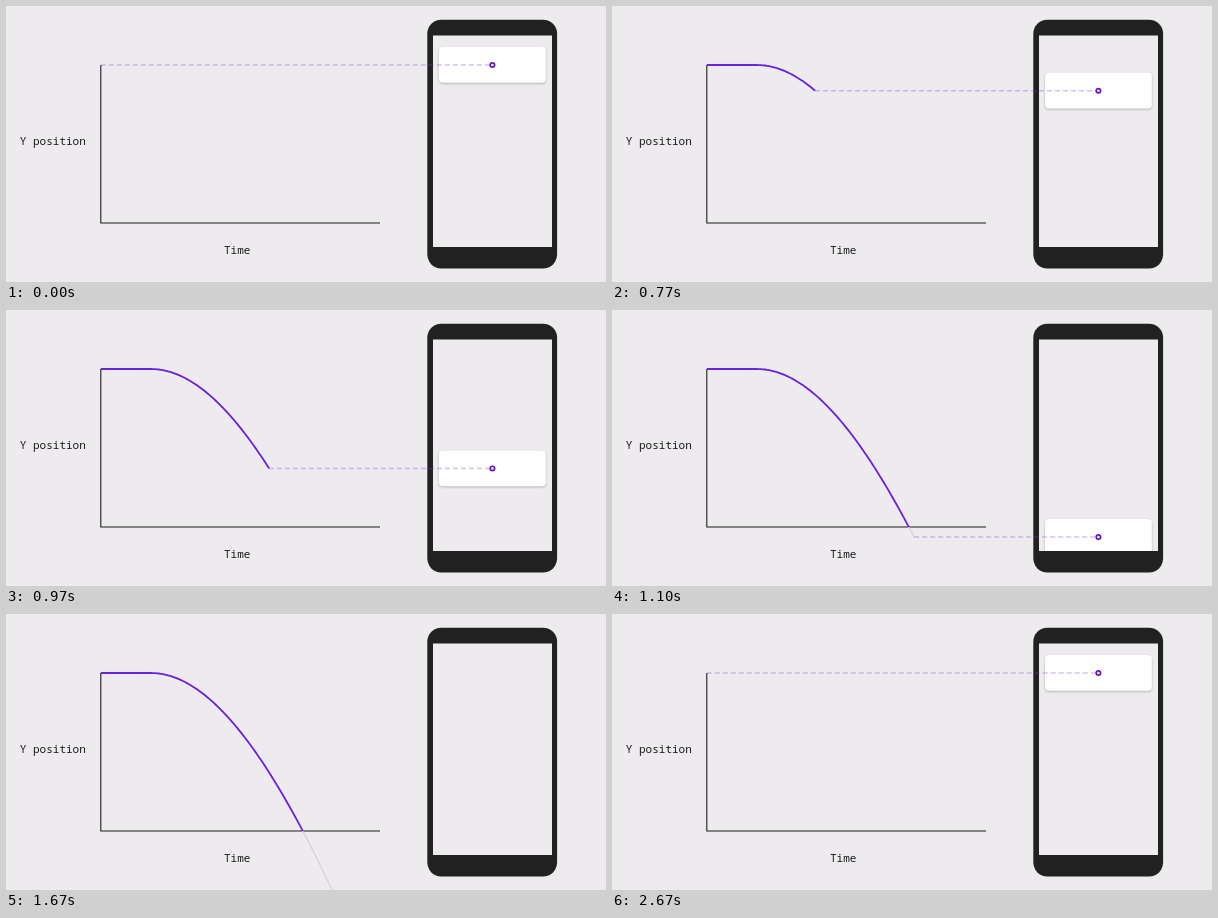
Write an HTML page that moves like this. It is 600 by 276 pixels and loops after 2.71 s.

```html
<!DOCTYPE html>
<html lang="en">
<head>
<meta charset="utf-8">
<title>Accelerating exit</title>
<style>
  html, body { margin: 0; width: 100%; height: 100%; overflow: hidden; background: #edebee; }
  svg { display: block; width: 100vw; height: 100vh; }
  text { font: 500 11px "Roboto Mono", "Noto Sans Mono", "DejaVu Sans Mono", monospace; fill: #1b1b1b; }
  .line { fill: none; stroke-linejoin: round; }
  #card { filter: drop-shadow(0 1px 1.3px rgba(0, 0, 0, .24)); }
</style>
</head>
<body>
<svg viewBox="0 0 600 276">
  <defs>
    <clipPath id="screen"><rect x="427" y="29.5" width="119" height="211.5"/></clipPath>
    <clipPath id="above"><rect x="90" y="50" width="300" height="167"/></clipPath>
    <clipPath id="below"><rect x="90" y="217" width="300" height="60"/></clipPath>
  </defs>

  <rect width="600" height="276" fill="#edebee"/>
  <text x="13.8" y="138.6">Y position</text>
  <text x="218" y="248.3">Time</text>

  <rect x="421.3" y="13.7" width="129.8" height="248.8" rx="14" fill="#212121"/>
  <rect x="427" y="29.5" width="119" height="211.5" fill="#edebee"/>
  <g clip-path="url(#screen)">
    <g id="card"><rect x="433" y="-18" width="106.8" height="35.8" rx="4" fill="#fefefe"/></g>
  </g>

  <path class="line" d="M94.8 59V217H374" stroke="#1d1d1d" stroke-width="1.1"/>
  <g id="graph">
    <g clip-path="url(#below)"><path id="tail" class="line" stroke="#d3d1d5" stroke-width="1.2"/></g>
    <g clip-path="url(#above)"><path id="curve" class="line" stroke="#6a22dc" stroke-width="1.8"/></g>
  </g>

  <g id="guide">
    <path id="dash" class="line" stroke="#7a3ee0" stroke-opacity=".32" stroke-width="1.5" stroke-dasharray="5 3"/>
    <circle id="dot" cx="486.4" r="2.2" fill="#f3eefb" stroke="#6119bd" stroke-width="1.7"/>
  </g>
</svg>
<script>
  const LOOP = 2710;
  const LEFT = 94.8, TOP = 59, FALL = 145, END = 345;
  const START = 330, RAMP = 160, SPEED = 0.3;
  const FADE = 2340, FADE_TIME = 330;

  const get = id => document.getElementById(id);
  const [card, graph, tail, curve, guide, dash, dot] =
    ["card", "graph", "tail", "curve", "guide", "dash", "dot"].map(get);
  const clamp = v => Math.max(0, Math.min(1, v));

  // Distance along the time axis: a short ramp, then constant speed.
  function tipX(t) {
    const e = Math.max(0, t - START);
    const run = e < RAMP ? SPEED * e * e / (2 * RAMP) : SPEED * (e - RAMP / 2);
    return Math.min(END, LEFT + run);
  }

  function height(x) {
    const u = Math.max(0, x - FALL);
    return TOP + 0.0081 * u * u - 8.2e-6 * u ** 3;
  }

  function tracePath(end) {
    let d = `M${LEFT} ${TOP}`;
    for (let x = FALL; x < end; x += 2) d += `L${x} ${height(x).toFixed(2)}`;
    return d + `L${end.toFixed(2)} ${height(end).toFixed(2)}`;
  }

  function draw(t) {
    const fade = clamp((t - FADE) / FADE_TIME);
    const x = tipX(t);
    const resetting = t >= FADE;
    const tip = resetting ? LEFT : x;
    const y = height(tip);

    const d = x > LEFT ? tracePath(x) : "";
    curve.setAttribute("d", d);
    tail.setAttribute("d", d);
    graph.setAttribute("opacity", 1 - fade);

    card.setAttribute("transform", `translate(0 ${y.toFixed(2)})`);
    card.setAttribute("opacity", resetting ? fade : 1);
    dash.setAttribute("d", `M${tip.toFixed(2)} ${y.toFixed(2)}H484`);
    dot.setAttribute("cy", y.toFixed(2));
    guide.setAttribute("opacity", resetting ? fade : 1);
  }

  const origin = performance.now();
  function tick() {
    draw((performance.now() - origin) % LOOP);
    requestAnimationFrame(tick);
  }
  tick();
</script>
</body>
</html>
```
